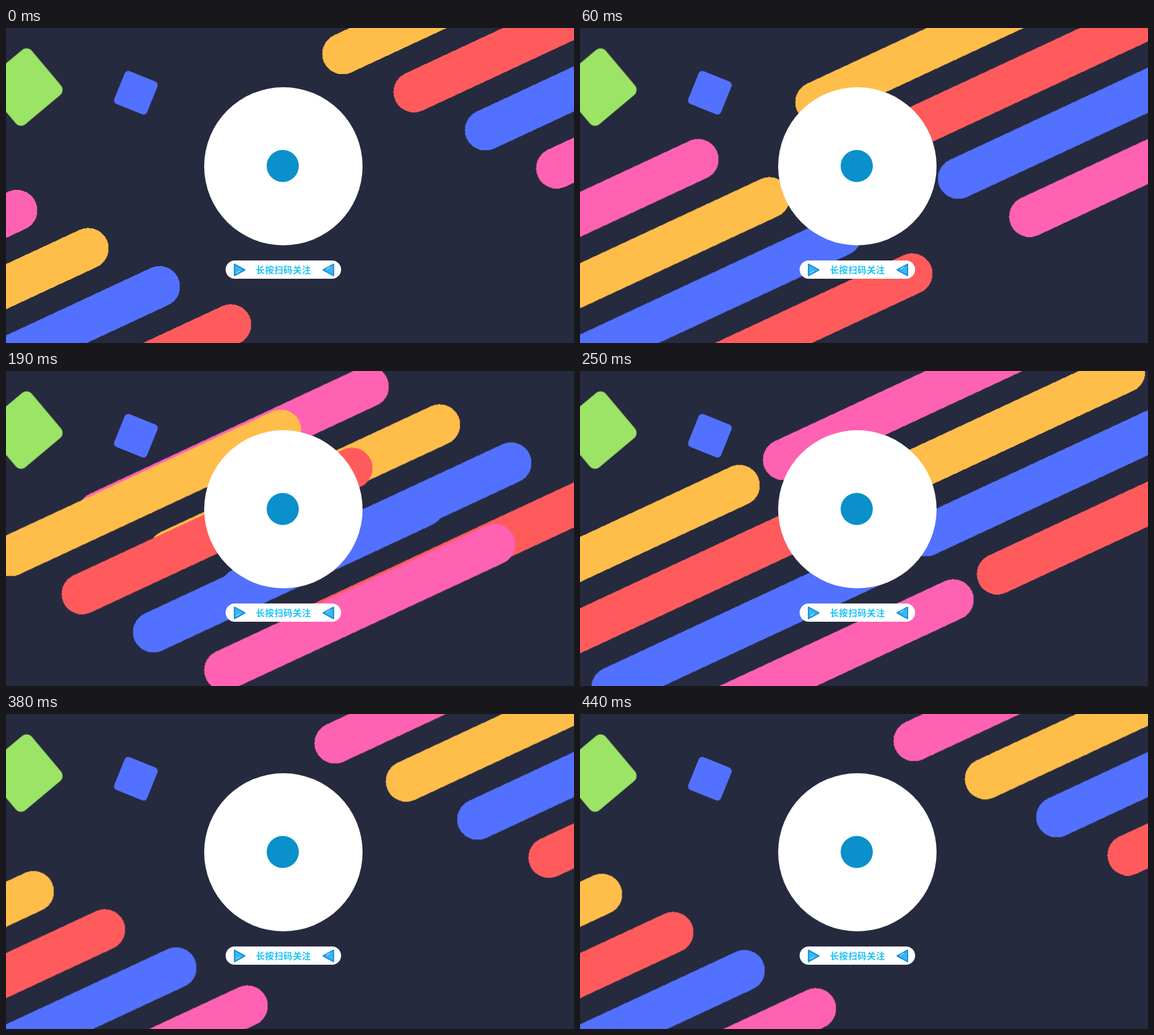
Recreate the animation shown at these times as an HTML page. Size 900x500 px, loop 1.62 s.

```html
<!DOCTYPE html>
<html lang="zh">
<head>
<meta charset="utf-8">
<title>长按扫码关注</title>
<style>
  html, body { margin: 0; width: 100%; height: 100%; overflow: hidden; background: #262a3e; }
  svg { display: block; width: 900px; height: 500px; }
  .bars { stroke-width: 65; stroke-linecap: round; shape-rendering: crispEdges; }
  .label {
    font: 700 14px "Noto Sans CJK SC", "Noto Sans CJK", sans-serif;
    letter-spacing: 0.6px;
    fill: #1cc3f6;
  }
  .arrow path { fill: #38b6f8; stroke: #1f93d6; stroke-width: 2; stroke-linejoin: round; }
  .arrow line { stroke: #a5e0ff; stroke-width: 1.2; stroke-linecap: round; }
</style>
</head>
<body>
<svg viewBox="0 0 900 500">
  <rect width="900" height="500" fill="#262a3e"/>
  <g class="bars" id="rising"></g>
  <g class="bars" id="falling"></g>

  <rect x="-46.8" y="-46.8" width="93.6" height="93.6" rx="11" fill="#9be465"
        transform="translate(28.2 93.8) rotate(50)"/>
  <rect x="-28" y="-28" width="56" height="56" rx="6" fill="#5271ff"
        transform="translate(205.8 102.8) rotate(22)"/>

  <circle cx="439.5" cy="219.5" r="125.5" fill="#fff"/>
  <circle cx="438.5" cy="219" r="25.5" fill="#0a90cb"/>

  <rect x="348" y="369" width="183" height="29" rx="14.5" fill="#fff"/>
  <g class="arrow">
    <path d="M362 375L378.500 384L362 393Z"/>
    <line x1="365.500" y1="388.500" x2="370" y2="386"/>
  </g>
  <g class="arrow">
    <path d="M519 375L502.500 384L519 393Z"/>
    <line x1="508" y1="382.500" x2="513" y2="379.500"/>
  </g>
  <text class="label" x="396" y="389">长按扫码关注</text>
</svg>
<script>
const LOOP = 1620;
const SPAN = { x: 428, y: -199.6 };   // from a bar's lower to its upper end
const ROW = { x: 113, y: 60.5 };
const COLOR = { yellow: '#ffbd4a', red: '#ff5b5c', blue: '#5271ff', pink: '#ff62b2' };

const TIMES = [0, 60, 130, 190, 250, 310, 380, 440];

// start is the lower end of the third bar; travel is the horizontal distance
const GROUPS = [
  {
    id: 'rising', colors: ['pink', 'yellow', 'blue', 'red'],
    start: [-184.8, 610], dir: 1, slope: -0.475,
    travel: [0, 170, 381, 557, 733, 907.5, 932, 940]
  },
  {
    id: 'falling', colors: ['yellow', 'red', 'blue', 'pink'],
    start: [759.5, 162], dir: -1, slope: -0.4797,
    travel: [0, 160, 354, 526, 709, 891, 918, 927]
  }
];

function addBar(group, row, color) {
  const line = document.createElementNS('http://www.w3.org/2000/svg', 'line');
  const x = ROW.x * (row - 2), y = ROW.y * (row - 2);
  const attrs = { x1: x, y1: y, x2: x + SPAN.x, y2: y + SPAN.y, stroke: COLOR[color] };
  for (const key in attrs) line.setAttribute(key, attrs[key]);
  group.appendChild(line);
}

for (const { id, colors, start, dir, slope, travel } of GROUPS) {
  const group = document.getElementById(id);
  colors.forEach((color, row) => addBar(group, row, color));

  const steps = travel.map((d, i) => {
    const dx = d * dir;
    return {
      offset: TIMES[i] / LOOP,
      transform: `translate(${start[0] + dx}px, ${start[1] + dx * slope}px)`,
      easing: 'steps(1, end)'
    };
  });
  steps.push({ ...steps[steps.length - 1], offset: 1 });
  group.animate(steps, { duration: LOOP, iterations: Infinity });
}
</script>
</body>
</html>
```
